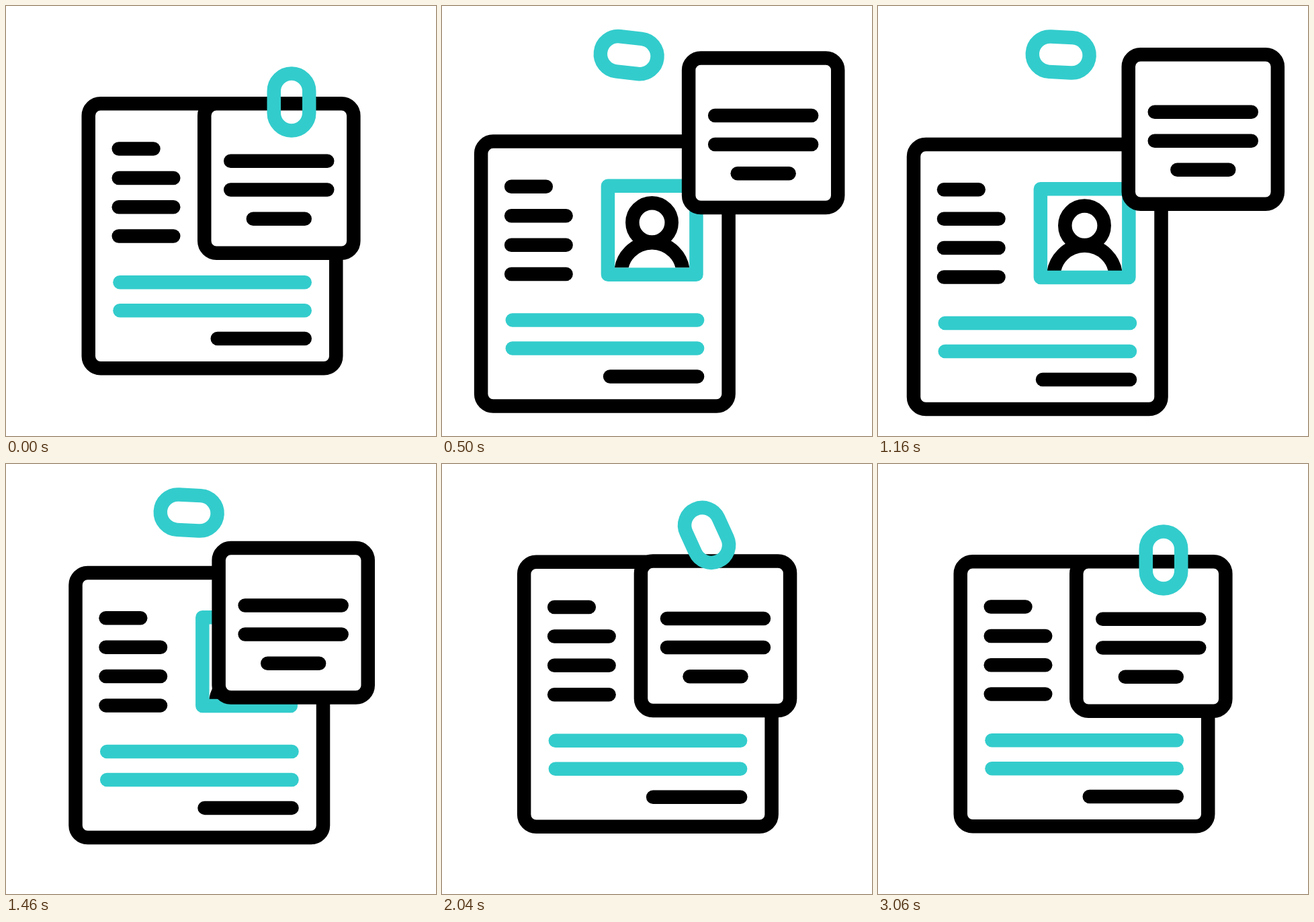
These frames come from a looping animation (640x640 px, 3.6 s). An HTML page with a canvas:

```html
<!DOCTYPE html>
<html lang="en">
<head>
<meta charset="utf-8">
<title>Clipped note</title>
<style>
html, body { margin: 0; width: 100%; height: 100%; overflow: hidden; background: #fff; }
canvas { display: block; width: 100vw; height: 100vh; object-fit: contain; }
</style>
</head>
<body>
<canvas id="stage" width="640" height="640"></canvas>
<script>
const ctx = document.getElementById('stage').getContext('2d');
const LOOP = 3600, STEP = 20;
const BLACK = '#000', TEAL = '#33cccc', LINE = 20.5;

const clamp = v => Math.min(1, Math.max(0, v));
const smooth = v => v * v * (3 - 2 * v);
const mix = (a, b, p) => a + (b - a) * p;

// Timing curve with flat ends; a and b set how long each end lingers.
function ease(x, a, b) {
  if (x <= 0 || x >= 1) return clamp(x);
  let lo = 0, hi = 1;
  for (let i = 0; i < 30; i++) {
    const s = (lo + hi) / 2, r = 1 - s;
    if (3 * r * r * s * a + 3 * r * s * s * b + s * s * s < x) lo = s;
    else hi = s;
  }
  return smooth(lo);
}

const cubic = (p, b, c, d) =>
  3 * p * (1 - p) ** 2 * b + 3 * p * p * (1 - p) * c + p ** 3 * d;

function spread(t) {
  return t < 1000 ? ease(t / 1000, 0.567, 0.064)
                  : 1 - ease((t - 1000) / 1220, 0.3, 0);
}

function clipLift(t) {
  return t < 1200 ? ease(t / 620, 0.4, 0.4)
                  : 1 - ease((t - 1580) / 580, 0.5, 0.9);
}

// Decaying swing, in degrees
const swingKeys = [[2160, 0], [2460, -15], [2610, 8.6], [2760, -5], [2910, 2.9], [3060, 0]];
function swing(t) {
  for (let i = 1; i < swingKeys.length; i++) {
    const [t0, v0] = swingKeys[i - 1], [t1, v1] = swingKeys[i];
    if (t >= t0 && t < t1) return mix(v0, v1, smooth((t - t0) / (t1 - t0)));
  }
  return 0;
}

function bar(x0, x1, y, color = BLACK) {
  ctx.strokeStyle = color;
  ctx.beginPath();
  ctx.moveTo(x0 + LINE / 2, y);
  ctx.lineTo(x1 - LINE / 2, y);
  ctx.stroke();
}

function panel(x, y, w, h, r, color, fill) {
  ctx.beginPath();
  ctx.roundRect(x + LINE / 2, y + LINE / 2, w - LINE, h - LINE, r);
  if (fill) {
    ctx.fillStyle = fill;
    ctx.fill();
  }
  ctx.strokeStyle = color;
  ctx.stroke();
}

function portrait() {
  ctx.save();
  ctx.beginPath();
  ctx.rect(310, 210, 135, 123.2);
  ctx.clip();
  ctx.strokeStyle = BLACK;
  for (const [y, r] of [[266, 29.2], [342, 46.2]]) {
    ctx.beginPath();
    ctx.arc(377.2, y, r, 0, Math.PI * 2);
    ctx.stroke();
  }
  ctx.restore();
  ctx.strokeStyle = TEAL;
  ctx.strokeRect(311.6, 211.5, 131.5, 131.8);
}

function sheet(p) {
  ctx.save();
  ctx.translate(-79.6 * p, 69.4 * p);
  panel(112.5, 135, 389, 414.5, 18, BLACK, '#fff');
  portrait();
  bar(157.5, 229.7, 212.5);
  for (const y of [255.9, 299.3, 342.6]) bar(157.5, 259.5, y);
  for (const y of [411.2, 453.2]) bar(159.2, 455, y, TEAL);
  bar(304.5, 455, 495.1);
  ctx.restore();
}

function note(p, angle) {
  ctx.save();
  ctx.translate(406.3 + 88.5 * p, 145.5 - 83.3 * p);
  ctx.rotate(angle * Math.PI / 180);
  ctx.translate(-406.3, -145.5);
  panel(285, 135, 242.6, 243, 18, BLACK, '#fff');
  bar(324, 488.5, 230.7);
  bar(324, 488.5, 273.6);
  bar(357.6, 455, 316.8);
  ctx.restore();
}

function paperclip(p) {
  ctx.save();
  ctx.translate(425 + cubic(p, -21.7, -105, -152.8), 143 + cubic(p, -55.6, -65.6, -70.5));
  ctx.rotate(-87 * p * Math.PI / 180);
  panel(-36.5, -52.7, 73, 105.4, 26.25, TEAL);
  ctx.restore();
}

function draw(t) {
  ctx.fillStyle = '#fff';
  ctx.fillRect(0, 0, 640, 640);
  ctx.lineWidth = LINE;
  ctx.lineCap = ctx.lineJoin = 'round';
  const p = spread(t);
  sheet(p);
  note(p, swing(t));
  paperclip(clipLift(t));
}

let start = null;
function tick() {
  const now = performance.now();
  if (start === null) start = now;
  draw(Math.floor(((now - start) % LOOP) / STEP) * STEP);
  requestAnimationFrame(tick);
}
tick();
</script>
</body>
</html>
```
